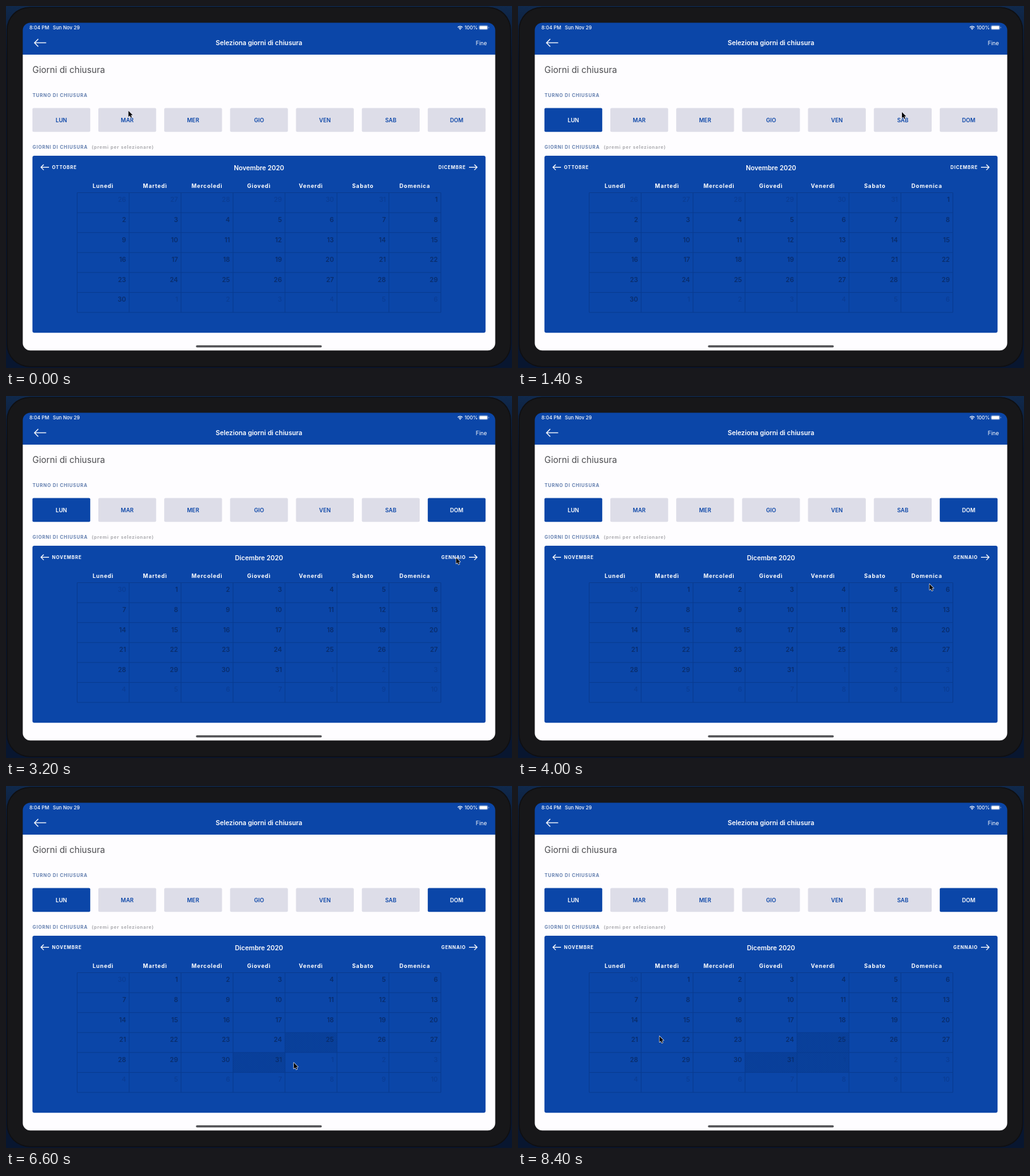
Write an HTML page with a canvas that moves like this. It is 800x573 px and loops after 8600 ms.

```html
<!DOCTYPE html>
<html lang="it">
<head>
<meta charset="utf-8">
<title>Giorni di chiusura</title>
<style>
html, body { margin: 0; width: 100%; height: 100%; overflow: hidden; background: #07132b; }
canvas { display: block; width: 800px; height: 573px; }
</style>
</head>
<body>
<canvas id="stage"></canvas>
<script>
const W = 800, H = 573, LOOP = 8600, STEP = 200;
const BLUE = '#0b46a8', WHITE = '#ffffff', LABEL = '#6580b0';
const canvas = document.getElementById('stage');
const ctx = canvas.getContext('2d');
const dpr = window.devicePixelRatio || 1;
canvas.width = W * dpr;
canvas.height = H * dpr;

const DAYS = ['Lunedì', 'Martedì', 'Mercoledì', 'Giovedì', 'Venerdì', 'Sabato', 'Domenica'];
const NOV = { title: 'Novembre 2020', prev: 'OTTOBRE', next: 'DICEMBRE', lead: 6, days: 30, before: 31 };
const DEC = { title: 'Dicembre 2020', prev: 'NOVEMBRE', next: 'GENNAIO', lead: 1, days: 31, before: 30 };
const GRID = { x: 112.5, y: 295.5, w: 82.15, h: 31.58 };

// Pointer path: time, x, y
const PATH = [
  [0, 193.6, 166], [400, 92, 174], [800, 92, 174], [1200, 440, 168], [1400, 607, 168],
  [1600, 672, 170], [2000, 677.6, 171], [2200, 690, 200], [2600, 712, 254], [3200, 711.6, 256],
  [3800, 711, 257], [4200, 590, 338], [4600, 465, 404], [5200, 465, 404], [5800, 415, 437],
  [6200, 415, 437], [6600, 455, 438], [6800, 468, 438], [7200, 468, 438], [7600, 420, 430],
  [8000, 262, 402], [8400, 223.6, 396]
];

// Selected cells: index in the grid, press time, hatch time
const MARKS = [[25, 4600, 5200], [31, 6200, 6400], [32, 6800, 7000]];

function box(x, y, w, h, r, fill) {
  ctx.beginPath();
  ctx.roundRect(x, y, w, h, r);
  ctx.fillStyle = fill;
  ctx.fill();
}

function line(color, width, ...pts) {
  ctx.beginPath();
  pts.forEach(([x, y], i) => i ? ctx.lineTo(x, y) : ctx.moveTo(x, y));
  ctx.strokeStyle = color;
  ctx.lineWidth = width;
  ctx.stroke();
}

// y is the middle of the capital letters
function text(str, x, y, size, color, { weight = 400, align = 'left', gap = 0 } = {}) {
  ctx.font = `${weight} ${size}px Inter, "Liberation Sans", sans-serif`;
  ctx.letterSpacing = gap + 'px';
  ctx.textAlign = align;
  ctx.fillStyle = color;
  const shift = align === 'right' ? gap : align === 'center' ? gap / 2 : 0;
  ctx.fillText(str, x + shift, y + size * 0.364);
}

function arrow(tip, tail, y, head) {
  const dir = Math.sign(tail - tip);
  line(WHITE, 1.3, [tip, y], [tail, y]);
  line(WHITE, 1.3, [tip + dir * head, y - head], [tip, y], [tip + dir * head, y + head]);
}

function device() {
  const back = ctx.createLinearGradient(0, 0, 0, H);
  back.addColorStop(0, '#10294c');
  back.addColorStop(0.15, '#081630');
  back.addColorStop(1, '#081630');
  ctx.fillStyle = back;
  ctx.fillRect(0, 0, W, H);
  box(1, 1.5, 797.5, 570, 36, '#0f0f11');
  box(2.5, 3, 794.5, 567, 35, '#171719');
  box(26.5, 77, 747, 468.3, [0, 0, 12, 12], '#fefdff');
  box(26.5, 26.5, 747, 50.5, [12, 12, 0, 0], BLUE);
  const bar = ctx.createLinearGradient(0, 536.8, 0, 540.8);
  bar.addColorStop(0, '#6d6d70');
  bar.addColorStop(0.5, '#48484b');
  bar.addColorStop(1, '#6d6d70');
  box(300.3, 537, 199, 3.5, 1.75, bar);
}

function statusBar() {
  const opt = { weight: 500 };
  text('8:04 PM', 37, 34.2, 7.7, WHITE, opt);
  text('Sun Nov 29', 74, 34.2, 7.7, WHITE, opt);
  text('100%', 745.8, 34.2, 7.7, WHITE, { weight: 500, align: 'right' });
  for (const r of [2.8, 5.2]) {
    ctx.beginPath();
    ctx.arc(718, 37.4, r, -Math.PI * 0.75, -Math.PI * 0.25);
    ctx.strokeStyle = WHITE;
    ctx.lineWidth = 1.3;
    ctx.stroke();
  }
  box(717, 35.9, 2, 1.6, 0.8, WHITE);
  ctx.beginPath();
  ctx.roundRect(747.6, 30.7, 14.4, 6.8, 2);
  ctx.strokeStyle = 'rgba(255,255,255,.45)';
  ctx.lineWidth = 0.6;
  ctx.stroke();
  box(748.5, 31.5, 12.6, 5.2, 1.2, WHITE);
  box(762.7, 33, 0.9, 2.2, 0.4, 'rgba(255,255,255,.55)');
}

function header() {
  statusBar();
  arrow(45, 63.5, 58.2, 6);
  text('Seleziona giorni di chiusura', 400, 58.5, 10.3, WHITE, { weight: 600, align: 'center' });
  text('Fine', 760.3, 58.5, 8.75, WHITE, { align: 'right' });
}

function shifts(t) {
  const label = { weight: 700, gap: 0.75 };
  text('Giorni di chiusura', 41.8, 101, 13.85, '#4b4b4f');
  text('TURNO DI CHIUSURA', 42, 141, 7.2, LABEL, label);
  DAYS.forEach((day, i) => {
    const x = 41.8 + i * 104.17;
    const on = (i === 0 && t >= 600) || (i === 6 && t >= 1800);
    box(x, 161.5, 91.4, 37.8, 2, on ? BLUE : '#dddde8');
    text(day.slice(0, 3).toUpperCase(), x + 45.7, 180.6, 8.75, on ? WHITE : BLUE,
      { weight: 600, align: 'center' });
  });
  text('GIORNI DI CHIUSURA', 42, 223, 7.2, LABEL, label);
  text('(premi per selezionare)', 135.4, 223, 7.2, '#acacb0', label);
}

function hatch(x, y) {
  ctx.save();
  ctx.beginPath();
  ctx.rect(x, y, GRID.w, GRID.h);
  ctx.clip();
  for (let d = -GRID.h; d < GRID.w; d += 3) {
    line('rgba(5,44,108,.32)', 0.9, [x + d, y], [x + d + GRID.h, y + GRID.h]);
  }
  ctx.restore();
}

function marks(t) {
  for (const [cell, press, done] of MARKS) {
    if (t < press) continue;
    const x = GRID.x + cell % 7 * GRID.w;
    const y = GRID.y + Math.floor(cell / 7) * GRID.h;
    ctx.fillStyle = t < done ? '#0a3f98' : '#0a429f';
    ctx.fillRect(x, y, GRID.w, GRID.h);
    if (t >= done) hatch(x, y);
  }
}

function dayCell(month, i) {
  const n = i - month.lead + 1;
  const inside = n >= 1 && n <= month.days;
  const day = inside ? n : n < 1 ? month.before + n : n - month.days;
  const x = GRID.x + (i % 7 + 1) * GRID.w - 4.9;
  const y = GRID.y + Math.floor(i / 7) * GRID.h + 11.2;
  text(String(day), x, y, 10.2, inside ? '#092d6d' : '#0b3d94',
    { weight: inside ? 600 : 500, align: 'right' });
}

function calendar(t) {
  const month = t < 2800 ? NOV : DEC;
  const nav = { weight: 700, gap: 0.75 };
  box(41.8, 237, 716.4, 280.3, 3, BLUE);
  arrow(55.3, 68, 255.3, 4.3);
  arrow(744.8, 732, 255.3, 4.3);
  text(month.prev, 72.8, 255.6, 7.2, WHITE, nav);
  text(month.next, 726.4, 255.6, 7.2, WHITE, { ...nav, align: 'right' });
  text(month.title, 400, 256, 10.2, WHITE, { weight: 600, align: 'center' });
  DAYS.forEach((day, i) => text(day, GRID.x + (i + 0.5) * GRID.w - 0.4, 284.4, 8.7, WHITE,
    { ...nav, align: 'center' }));
  marks(t);
  const right = GRID.x + 7 * GRID.w, bottom = GRID.y + 6 * GRID.h;
  for (let i = 0; i < 8; i++) {
    const x = GRID.x + i * GRID.w;
    line('#093a8d', 0.9, [x, GRID.y], [x, bottom]);
  }
  for (let i = 0; i < 7; i++) {
    const y = GRID.y + i * GRID.h;
    line('#093a8d', 0.9, [GRID.x, y], [right, y]);
  }
  for (let i = 0; i < 42; i++) dayCell(month, i);
}

function pointer(t) {
  let i = PATH.findIndex(p => p[0] > t);
  if (i < 0) i = PATH.length - 1;
  const [t0, x0, y0] = PATH[i - 1], [t1, x1, y1] = PATH[i];
  const k = Math.min(1, (t - t0) / (t1 - t0));
  ctx.save();
  ctx.translate(x0 + (x1 - x0) * k, y0 + (y1 - y0) * k);
  ctx.beginPath();
  [[0, 0], [0, 9.4], [2.2, 7.4], [3.7, 10.8], [5.3, 10.1], [3.8, 6.8], [6.7, 6.7]]
    .forEach(([x, y]) => ctx.lineTo(x, y));
  ctx.closePath();
  ctx.lineJoin = 'round';
  ctx.strokeStyle = '#e9e9f2';
  ctx.lineWidth = 1.3;
  ctx.stroke();
  ctx.fillStyle = '#050507';
  ctx.fill();
  ctx.restore();
}

function draw(t) {
  ctx.setTransform(dpr, 0, 0, dpr, 0, 0);
  device();
  header();
  shifts(t);
  calendar(t);
  pointer(t);
}

const start = performance.now();
function tick() {
  const t = (performance.now() - start) % LOOP;
  draw(Math.floor(t / STEP) * STEP);
  requestAnimationFrame(tick);
}
tick();
</script>
</body>
</html>
```
